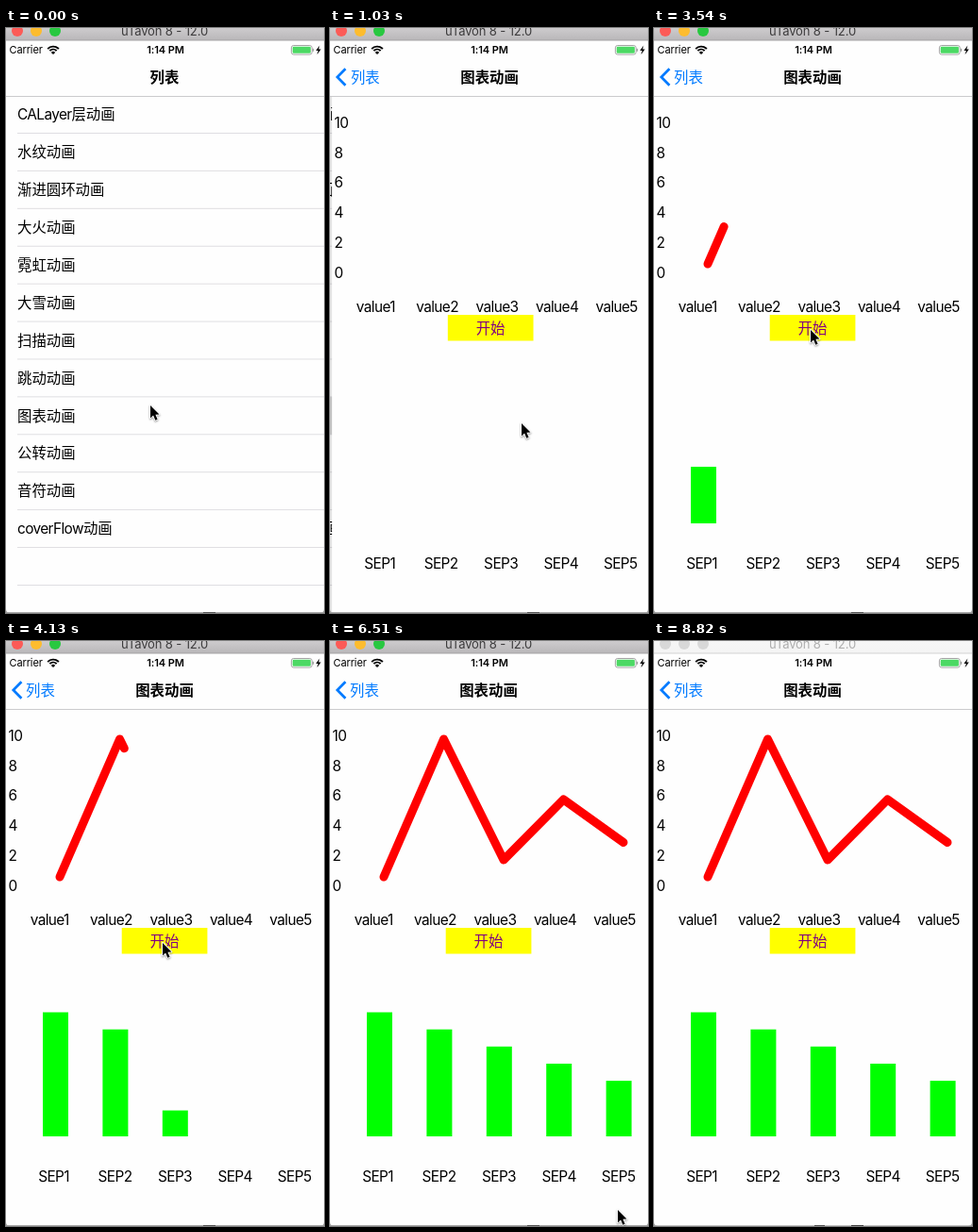
An HTML page with a canvas for the animation above (8.92 s loop, 337x620 px).

```html
<!DOCTYPE html>
<html lang="zh">
<head>
<meta charset="utf-8">
<title>图表动画</title>
<style>
html, body { margin: 0; width: 100%; height: 100%; overflow: hidden; background: #fff; }
canvas { display: block; width: 337px; height: 620px; }
</style>
</head>
<body>
<canvas id="stage"></canvas>
<script>
const W = 337, H = 620, LOOP = 8920, STEP = 147.8;
const FONT = 'Inter, "Noto Sans CJK SC", "Noto Sans CJK", sans-serif';
const BLUE = '#007aff', PAGE = '#fefefe', SIZE = 15.4;
const PITCH = 63.4;
const ROWS = ['CALayer层动画', '水纹动画', '渐进圆环动画', '大火动画', '霓虹动画', '大雪动画',
  '扫描动画', '跳动动画', '图表动画', '公转动画', '音符动画', 'coverFlow动画'];
const LINE = [[57, 250], [120.5, 104], [184, 232], [247.5, 168], [311, 213.5]];

// pointer path: step, x, y
const POINTER = [
  [0, 153, 400], [2, 203, 419], [8, 203, 419], [12, 186, 326], [13, 186, 326],
  [14, 159, 310], [15, 166, 320], [37, 166, 320], [39, 244, 563], [43, 244, 563],
  [44, 305, 603], [50, 191, 349], [51, 191, 349], [52, 187, 332], [54, 323, 592],
  [55, 323, 592], [56, 317, 604], [57, 330, 626], [99, 330, 626]
];

const canvas = document.getElementById('stage');
const ctx = canvas.getContext('2d');
const dpr = window.devicePixelRatio || 1;
canvas.width = Math.round(W * dpr);
canvas.height = Math.round(H * dpr);

const clamp = v => Math.max(0, Math.min(1, v));
const mix = (a, b, p) => a + (b - a) * p;

// cubic-bezier(x1, 0, x2, 1)
function ease(x1, x2, t) {
  if (t <= 0 || t >= 1) return clamp(t);
  let lo = 0, hi = 1;
  for (let i = 0; i < 30; i++) {
    const s = (lo + hi) / 2, r = 1 - s;
    if (3 * r * r * s * x1 + 3 * r * s * s * x2 + s ** 3 < t) lo = s; else hi = s;
  }
  return lo * lo * (3 - 2 * lo);
}

function rect(x, y, w, h, color) {
  ctx.fillStyle = color;
  ctx.fillRect(x, y, w, h);
}

function disc(x, y, r, color) {
  ctx.fillStyle = color;
  ctx.beginPath();
  ctx.arc(x, y, r, 0, Math.PI * 2);
  ctx.fill();
}

function trace(points) {
  ctx.beginPath();
  points.forEach(([x, y], i) => i ? ctx.lineTo(x, y) : ctx.moveTo(x, y));
}

// Latin runs are tracked tightly, Chinese runs are not
function text(str, x, y, { size = SIZE, weight = 400, color = '#000', center = false, track = -0.04 } = {}) {
  ctx.font = `${weight} ${size}px ${FONT}`;
  ctx.fillStyle = color;
  const runs = str.match(/[\x00-\x7f]+|[^\x00-\x7f]+/g).map(s => {
    const gap = s.charCodeAt(0) < 128 ? track * size : 0;
    ctx.letterSpacing = gap + 'px';
    return { s, gap, w: ctx.measureText(s).width };
  });
  if (center) x -= runs.reduce((sum, r) => sum + r.w, 0) / 2;
  for (const r of runs) {
    ctx.letterSpacing = r.gap + 'px';
    ctx.fillText(r.s, x, y);
    x += r.w;
  }
}

function titleBar(active) {
  const g = ctx.createLinearGradient(0, 0, 0, 13);
  g.addColorStop(0, active ? '#cdcbcd' : '#f6f6f6');
  g.addColorStop(1, active ? '#b9b7b9' : '#f4f4f4');
  rect(0, 0, W, 13, g);
  rect(0, 12.5, W, 1, active ? '#a5a3a5' : '#d4d4d4');
  const lights = active ? ['#fc5b57', '#fdbc2e', '#28c840'] : ['#d8d8d8', '#d8d8d8', '#d8d8d8'];
  lights.forEach((c, i) => disc(12 + 20 * i, 3, 6, c));
  text('uTavon 8 - 12.0', 168, 8.2, { size: 13, color: active ? '#3c3b3c' : '#adadad', center: true, track: -0.01 });
}

function statusBar() {
  text('Carrier', 3.5, 27.2, { size: 11, track: -0.01 });
  text('1:14 PM', 169, 27.2, { size: 11, weight: 600, center: true, track: -0.01 });

  ctx.strokeStyle = '#000';
  ctx.lineWidth = 1.9;
  for (const r of [5, 8]) {
    ctx.beginPath();
    ctx.arc(50, 27.6, r, -Math.PI * 0.76, -Math.PI * 0.24);
    ctx.stroke();
  }
  ctx.fillStyle = '#000';
  ctx.beginPath();
  ctx.moveTo(50, 28);
  ctx.arc(50, 28, 3, -Math.PI * 0.76, -Math.PI * 0.24);
  ctx.fill();

  ctx.strokeStyle = '#9a9a9a';
  ctx.lineWidth = 0.9;
  ctx.beginPath();
  ctx.roundRect(302.4, 18.5, 21.8, 9.6, 2.4);
  ctx.stroke();
  ctx.fillStyle = '#4cd964';
  ctx.beginPath();
  ctx.roundRect(303.7, 19.8, 19.2, 7, 1.2);
  ctx.fill();
  rect(325, 21.8, 1.2, 3, '#9a9a9a');
  ctx.fillStyle = '#000';
  trace([[332.4, 18.6], [328.4, 24], [330.8, 24], [329.6, 28.2], [333.8, 22.4], [331.3, 22.4]]);
  ctx.fill();
}

function navBar(p) {
  rect(0, 13.5, W, 59, PAGE);
  rect(0, 72, W, 0.9, '#c6c6c8');
  statusBar();
  const y = 57.7, title = { weight: 700, center: true };
  const x = mix(168, 36.5, p);
  ctx.globalAlpha = 1 - p;
  text('列表', x, y, title);
  ctx.globalAlpha = p;
  text('列表', x, y, { color: BLUE, center: true });
  text('图表动画', mix(336, 168, p), y, title);
  ctx.strokeStyle = BLUE;
  ctx.lineWidth = 2.7;
  ctx.lineJoin = 'miter';
  ctx.lineCap = 'butt';
  trace([[16.4, 43.3], [7.8, 52], [16.4, 60.7]]);
  ctx.stroke();
  ctx.globalAlpha = 1;
}

function listPage(p, pressed) {
  rect(0, 72, W, H - 72, PAGE);
  ctx.save();
  ctx.translate(-0.3 * W * p, 0);
  if (pressed) rect(0, 391, W, 40, '#d9d9d9');
  ROWS.forEach((s, i) => text(s, 12, 97.2 + 39.92 * i));
  for (let i = 0; i < 13; i++) rect(12, 111 + 39.92 * i, W, 0.9, '#dcdbdf');
  ctx.restore();
  if (p) rect(0, 72, W, H - 72, `rgba(0,0,0,${0.1 * p})`);
}

function strokeLine(fraction) {
  if (fraction <= 0) return;
  const lens = LINE.slice(1).map(([x, y], i) => Math.hypot(x - LINE[i][0], y - LINE[i][1]));
  let left = fraction * lens.reduce((a, b) => a + b);
  const shown = [LINE[0]];
  lens.forEach((len, i) => {
    if (left <= 0) return;
    const q = Math.min(1, left / len), [x, y] = LINE[i], [u, v] = LINE[i + 1];
    shown.push([mix(x, u, q), mix(y, v, q)]);
    left -= len;
  });
  ctx.strokeStyle = '#f00';
  ctx.lineWidth = 9;
  ctx.lineCap = ctx.lineJoin = 'round';
  trace(shown);
  ctx.stroke();
}

function fillBars(fraction) {
  const height = i => 131.5 - 18.15 * i;
  let left = fraction * 5 * height(2);
  for (let i = 0; i < 5 && left > 0; i++) {
    const h = Math.min(left, height(i));
    rect(39 + PITCH * i, 525 - h, 27, h, '#0f0');
    left -= h;
  }
}

function chartPage(offset, t) {
  ctx.save();
  ctx.translate(offset, 0);
  rect(0, 72, W, H - 72, PAGE);
  for (let i = 0; i < 6; i++) text(String(10 - 2 * i), 2.5, 105.9 + 31.75 * i);
  for (let i = 0; i < 5; i++) {
    text('value' + (i + 1), 25.7 + PITCH * i, 301);
    text('SEP' + (i + 1), 34.2 + PITCH * i, 573);
  }
  rect(122.7, 304, 90.7, 27.5, '#ff0');
  text('开始', 168, 323.7, { color: '#800080', center: true });
  strokeLine(ease(0.42, 1, t));
  fillBars(ease(0.42, 0.58, t));
  ctx.restore();
}

function windowEdge(active) {
  rect(0, 619, W, 1, active ? '#a9a9a9' : '#c4c4c4');
  rect(active ? 209 : 170, 619, active ? 13 : 11, 1, '#555');
  if (!active) rect(209, 619, 13, 1, '#444');
  ctx.fillStyle = '#a0a0a0';
  for (const [x, d] of [[0, 1], [W, -1]]) {
    ctx.beginPath();
    ctx.moveTo(x, 616);
    ctx.quadraticCurveTo(x, 619.5, x + 4 * d, 619.5);
    ctx.lineTo(x, H);
    ctx.fill();
  }
}

function pointer(k) {
  const i = POINTER.findIndex(p => p[0] > k);
  const a = POINTER[i - 1], b = POINTER[i], q = (k - a[0]) / (b[0] - a[0]);
  ctx.save();
  ctx.translate(mix(a[1], b[1], q), mix(a[2], b[2], q));
  trace([[0, 0], [0, 13.4], [3.1, 10.6], [5.3, 15.7], [7.6, 14.7], [5.4, 9.7], [9.5, 9.6]]);
  ctx.closePath();
  ctx.lineJoin = 'round';
  ctx.lineWidth = 1.8;
  ctx.strokeStyle = '#fff';
  ctx.shadowColor = 'rgba(0,0,0,.4)';
  ctx.shadowBlur = 2 * dpr;
  ctx.shadowOffsetY = dpr;
  ctx.stroke();
  ctx.shadowColor = 'transparent';
  ctx.fillStyle = '#000';
  ctx.fill();
  ctx.restore();
}

function draw(time) {
  // the screen is sampled at a fixed, coarse rate
  const k = Math.floor((time + 10) / STEP);
  const now = k * 147.5;
  const active = time < 8820;

  // critically damped push between the two pages
  const w = 18.26 * Math.max(0, now - 640) / 1000;
  const rest = k < 5 ? 1 : k > 7 ? 0 : (1 + w) * Math.exp(-w);

  ctx.setTransform(dpr, 0, 0, dpr, 0, 0);
  rect(0, 0, W, H, PAGE);
  if (rest > 0) listPage(1 - rest, k >= 5);
  if (rest < 1) chartPage(rest * W, clamp((now - 3046) / 2000));
  navBar(1 - rest);
  titleBar(active);
  windowEdge(active);
  if (k < 57) pointer(k);
}

const start = performance.now();
function tick() {
  draw((performance.now() - start) % LOOP);
  requestAnimationFrame(tick);
}
tick();
</script>
</body>
</html>
```
